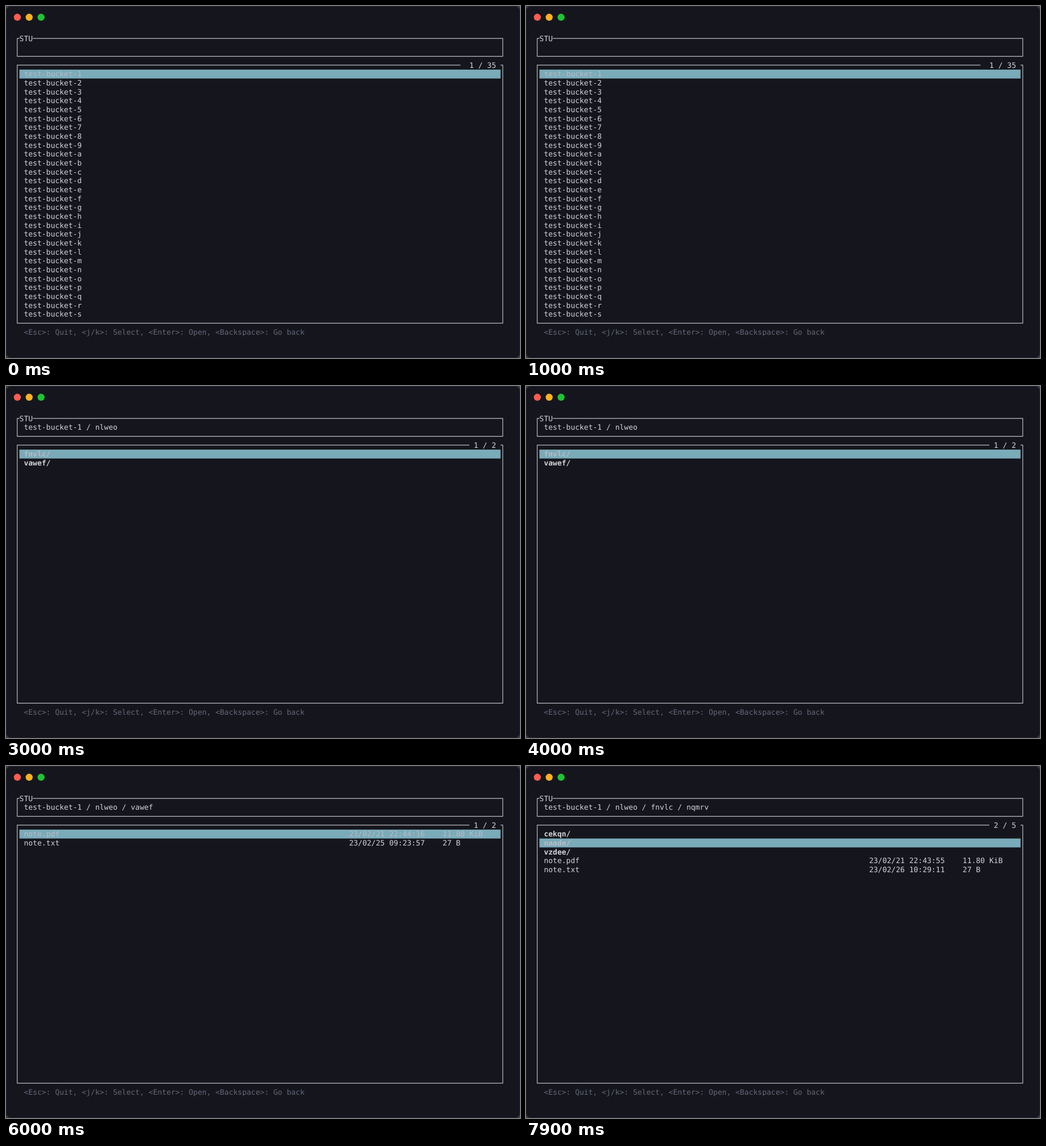
Write an HTML page that moves like this. It is 903 px wide and 620 px high and loops after 8 s.

```html
<!DOCTYPE html>
<html lang="en">
<head>
<meta charset="utf-8">
<style>
html, body { margin: 0; width: 100%; height: 100%; overflow: hidden; background: #3a3b46; }
svg { display: block; width: 903px; height: 620px; }
text { font: 13px "DejaVu Sans Mono", monospace; fill: #d2d3d6; text-rendering: geometricPrecision; white-space: pre; }
.dir { font-weight: bold; }
.sel { fill: #b7bcc6; }
.help { fill: #646679; }
path { fill: none; stroke: #bcbdc1; stroke-width: 1.2; }
</style>
</head>
<body>
<svg viewBox="0 0 903 620">
  <rect x=".5" y=".5" width="902" height="619" rx="8" fill="#15161d" stroke="#20212b"/>
  <circle cx="19.9" cy="19.8" r="6.2" fill="#ff5b50"/>
  <circle cx="40.7" cy="19.8" r="6.2" fill="#fdb124"/>
  <circle cx="61.6" cy="19.8" r="6.2" fill="#20c234"/>
  <g id="screen"></g>
</svg>
<script>
const LOOP = 8000, CW = 7.826, RH = 15.67, X0 = 23.6, Y0 = 57.2;
const screen = document.getElementById('screen');

const views = {
  buckets: { path: [], rows: [...'123456789abcdefghijklmnopqrs'].map(c => ['test-bucket-' + c]), total: 35 },
  root: { path: ['test-bucket-1'], rows: [['nlweo/']] },
  nlweo: { path: ['test-bucket-1', 'nlweo'], rows: [['fnvlc/'], ['vawef/']] },
  fnvlc: { path: ['test-bucket-1', 'nlweo', 'fnvlc'], rows: [['nqmrv/']] },
  vawef: {
    path: ['test-bucket-1', 'nlweo', 'vawef'],
    rows: [['note.pdf', '23/02/21 22:44:16', '11.80 KiB'], ['note.txt', '23/02/25 09:23:57', '27 B']]
  },
  nqmrv: {
    path: ['test-bucket-1', 'nlweo', 'fnvlc', 'nqmrv'],
    rows: [['cekqn/'], ['naade/'], ['vzdee/'],
      ['note.pdf', '23/02/21 22:43:55', '11.80 KiB'], ['note.txt', '23/02/26 10:29:11', '27 B']]
  }
};

// [start in ms, view, selected row]
const steps = [
  [0, 'buckets', 0], [100, 'buckets', 1], [300, 'buckets', 2], [700, 'buckets', 1], [1000, 'buckets', 0],
  [1600, 'root', 0], [2300, 'nlweo', 0], [2500, 'nlweo', 1], [2800, 'nlweo', 0],
  [4500, 'fnvlc', 0], [4900, 'nlweo', 0], [5200, 'nlweo', 1], [5600, 'vawef', 0],
  [6100, 'nlweo', 1], [6400, 'nlweo', 0], [7000, 'fnvlc', 0], [7400, 'nqmrv', 0], [7700, 'nqmrv', 1]
];

const colX = c => X0 + c * CW;
const rowY = r => Y0 + r * RH;
const put = (col, row, str, cls = '') =>
  `<text x="${colX(col)}" y="${rowY(row) + 4.4}" class="${cls}">${str.replace(/</g, '&lt;')}</text>`;

// Frame whose top edge is open between two columns
const frame = (top, bottom, from, to) => {
  const l = colX(-0.5), r = colX(108.5), y = rowY(top);
  return `<path d="M${colX(from)} ${y}H${l}V${rowY(bottom)}H${r}V${y}H${colX(to)}"/>`;
};

function render([, name, sel]) {
  const { path, rows, total = rows.length } = views[name];
  const count = `${String(sel + 1).padStart(String(total).length)} / ${total}`;
  const list = rows.map(([file, date, size], i) => {
    const cls = (file.endsWith('/') ? 'dir ' : '') + (i === sel ? 'sel' : '');
    const row = 4 + i;
    return put(1, row, file, cls) + (date ? put(74, row, date, cls) + put(95, row, size, cls) : '');
  });
  screen.innerHTML =
    frame(0, 2, 0, 3) + put(0, 0, 'STU') + put(1, 1, path.join(' / ')) +
    frame(3, 32, 106 - count.length, 108) + put(107 - count.length, 3, count) +
    `<rect x="${X0}" y="${rowY(3.5 + sel)}" width="${108 * CW}" height="${RH}" fill="#7aabb9"/>` +
    list.join('') +
    put(1, 33, '<Esc>: Quit, <j/k>: Select, <Enter>: Open, <Backspace>: Go back', 'help');
}

let shown;
function tick() {
  const t = performance.now() % LOOP;
  const step = steps.findLast(s => s[0] <= t);
  if (step !== shown) render(shown = step);
  requestAnimationFrame(tick);
}
tick();
</script>
</body>
</html>
```
